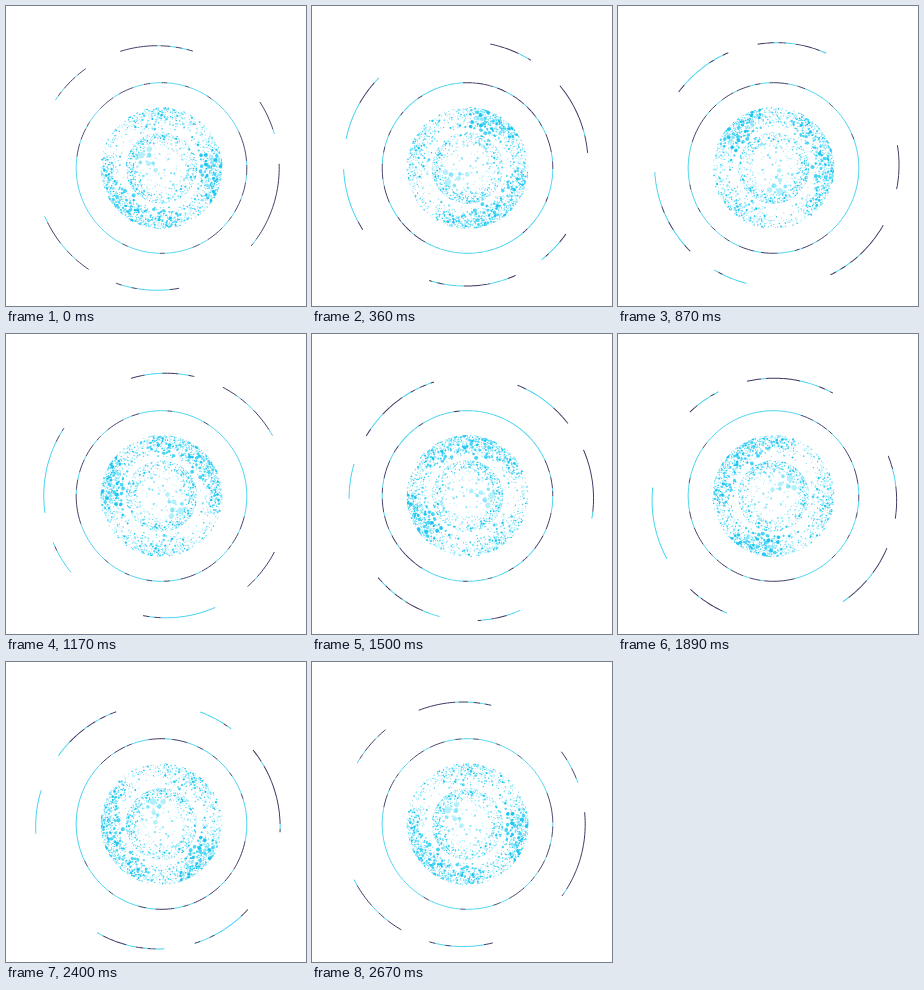
An HTML page for the animation above (2.7 s loop, 300 by 300 pixels).

```html
<!DOCTYPE html>
<html lang="en">
<head>
<meta charset="utf-8">
<title>Orbit rings</title>
<style>
html, body { margin: 0; width: 100%; height: 100%; overflow: hidden; background: #fff; }
svg { display: block; width: 100vw; height: 100vh; }
path { fill: none; }
</style>
</head>
<body>
<svg viewBox="0 0 300 300">
  <clipPath id="outer"><circle r="61"/></clipPath>
  <clipPath id="inner"><circle r="35.8"/></clipPath>
  <g transform="translate(155.5 162)">
    <g id="band" clip-path="url(#outer)"></g>
    <g id="disc" clip-path="url(#inner)"></g>
    <g id="ring"></g>
    <g id="arcs"></g>
  </g>
</svg>
<script>
const LOOP = 2700, RAD = Math.PI / 180;
const CYAN = '#3fd2ee', NAVY = '#38345f';
const TINTS = ['#22c6f0', '#48d5f6', '#86e5fa', '#b4effc'];
const $ = id => document.getElementById(id);

let seed = 41;
const rnd = () => {
  seed = (seed + 0x6D2B79F5) | 0;
  let x = Math.imul(seed ^ seed >>> 15, 1 | seed);
  x = x + Math.imul(x ^ x >>> 7, 61 | x) ^ x;
  return ((x ^ x >>> 14) >>> 0) / 4294967296;
};
const range = (a, b) => a + (b - a) * rnd();
const clamp = x => Math.min(1, Math.max(0, x));

// Bell around angle c, width w
function bump(t, c, w) {
  const d = (((t - c) % 360) + 900) % 360 - 180;
  return Math.exp(-d * d / (2 * w * w));
}

function addPath(parent, d, attrs) {
  const p = document.createElementNS('http://www.w3.org/2000/svg', 'path');
  p.setAttribute('d', d);
  for (const k in attrs) p.setAttribute(k, attrs[k]);
  parent.appendChild(p);
  return p;
}

// Line from angle a to b on a curve of radius r(angle)
function curve(a, b, r) {
  const n = Math.max(1, Math.ceil((b - a) / 1.5));
  let d = '';
  for (let i = 0; i <= n; i++) {
    const t = a + (b - a) * i / n, q = r(t);
    d += (i ? 'L' : 'M') + (q * Math.cos(t * RAD)).toFixed(2) + ' ' + (q * Math.sin(t * RAD)).toFixed(2);
  }
  return d;
}

// Short pieces, each navy while the shade at its angle exceeds its limit
function streak(parent, a, b, r, width) {
  const pieces = [];
  for (let t = a; t < b;) {
    const e = Math.min(b, t + range(1.5, 5));
    const path = addPath(parent, curve(t, e, r), { 'stroke-width': width });
    pieces.push({ path, mid: (t + e) / 2, limit: rnd() });
    t = e;
  }
  return pieces;
}

function paint(pieces, shade, turned) {
  for (const p of pieces)
    p.path.setAttribute('stroke', shade(p.mid + turned) > p.limit ? NAVY : CYAN);
}

// Start and end angles
const ARCS = [[-109.5, -75], [-147.4, -127.3], [125.7, 157.6], [81.7, 111.6], [-2, 41], [-33.9, -16.8]];
const arcs = ARCS.flatMap(([a, b]) =>
  streak($('arcs'), a, b, t => 122.2 - 4.5 * Math.cos(t * RAD), .95));
const arcShade = t => .68 + .17 * Math.cos(t * RAD) -
  .75 * bump(t, 180, 18) - .4 * bump(t, 75, 24) - .3 * bump(t, 300, 15);

const ring = streak($('ring'), 0, 360, () => 85.3, .9);
paint(ring, t => .12 + .55 * bump(t, 25, 20) + .6 * bump(t, 226, 26) +
  .5 * bump(t, 290, 10) + .45 * bump(t, 343, 10), 0);

let shapes, placed;
function dot(r, t, s, tint) {
  const x = r * Math.cos(t * RAD), y = r * Math.sin(t * RAD);
  for (const p of placed)
    if (Math.hypot(p[0] - x, p[1] - y) < (p[2] + s) * .86) return;
  placed.push([x, y, s]);
  const w = s * range(.8, 1.2), h = (s * range(.8, 1.2)).toFixed(2);
  const tilt = Math.round(range(0, 180));
  const c = Math.cos(tilt * RAD) * w, n = Math.sin(tilt * RAD) * w;
  const arc = `a${w.toFixed(2)} ${h} ${tilt} 1 0 `;
  shapes[tint] += `M${(x - c).toFixed(2)} ${(y - n).toFixed(2)}` +
    `${arc}${(2 * c).toFixed(2)} ${(2 * n).toFixed(2)}` +
    `${arc}${(-2 * c).toFixed(2)} ${(-2 * n).toFixed(2)}z`;
}

function scatter(id, fill) {
  shapes = TINTS.map(() => '');
  placed = [];
  fill();
  shapes.forEach((d, i) => addPath($(id), d, { style: 'fill:' + TINTS[i] }));
}

scatter('band', () => {
  for (let i = 0; i < 6500; i++) {
    const t = range(0, 360), r = Math.sqrt(range(39 * 39, 61 * 61));
    const main = bump(t, 6, 27), low = bump(t, 148, 24), base = bump(t, 94, 22), top = bump(t, 266, 17);
    const edge = .12 + .88 * clamp((r - 41) / 14);
    if (rnd() > (.13 + .8 * main + .5 * low + .5 * base + .45 * top) * edge) continue;
    const strong = main + .8 * low + .8 * base + .6 * top;
    const s = .38 + Math.pow(rnd(), 1.9) * (.55 + 1.4 * main + .8 * low + .9 * base + .5 * top);
    dot(r, t, s, Math.floor(rnd() * (strong > .5 ? 2.6 : 4)));
  }
});

scatter('disc', () => {
  // Large pale dots, then fine ones that gather at the rim
  for (let i = 0; i < 26; i++)
    dot(range(4, 25), 197 + range(-45, 45), range(1.4, 3.1), 2 + Math.floor(rnd() * 2));
  for (let i = 0; i < 3600; i++) {
    const t = range(0, 360), r = 36 * Math.sqrt(rnd());
    const rim = clamp((r - 17) / 18);
    const lobes = bump(t, 142, 28) + bump(t, 222, 22) + bump(t, 262, 18) + .7 * bump(t, 10, 32);
    if (rnd() > .04 + rim * rim * (.25 + .6 * lobes)) continue;
    const tint = rim < .4 ? 2 + Math.floor(rnd() * 2) : Math.floor(rnd() * (lobes > .5 ? 2.6 : 4));
    dot(r, t, .38 + Math.pow(rnd(), 2) * .85, tint);
  }
});

// Turn over the loop: time in ms, angle in degrees
const KEYS = [[-30, -3.7], [0, 0], [360, 67.8], [870, 137], [1500, 212.6],
  [1890, 259], [2130, 289.4], [2670, 356.3], [2700, 360], [3060, 427.8]];

function slope(i) {
  const [a, b, c] = [KEYS[i - 1], KEYS[i], KEYS[i + 1]];
  const h = b[0] - a[0], k = c[0] - b[0];
  return ((b[1] - a[1]) / h * k + (c[1] - b[1]) / k * h) / (h + k);
}

function turn(t) {
  let i = 1;
  while (t >= KEYS[i + 1][0]) i++;
  const [t0, a0] = KEYS[i], [t1, a1] = KEYS[i + 1];
  const h = t1 - t0, u = (t - t0) / h, v = 1 - u;
  return a0 * (1 + 2 * u) * v * v + a1 * u * u * (3 - 2 * u) +
    h * u * v * (slope(i) * v - slope(i + 1) * u);
}

function draw(ms) {
  const a = turn(Math.floor(ms % LOOP / 30 + 1e-6) * 30 % LOOP);
  $('arcs').setAttribute('transform', `rotate(${a})`);
  for (const id of ['ring', 'band', 'disc'])
    $(id).setAttribute('transform', `rotate(${-a})`);
  paint(arcs, arcShade, a);
}

const start = performance.now();
function tick() {
  draw(performance.now() - start);
  requestAnimationFrame(tick);
}
tick();
</script>
</body>
</html>
```
